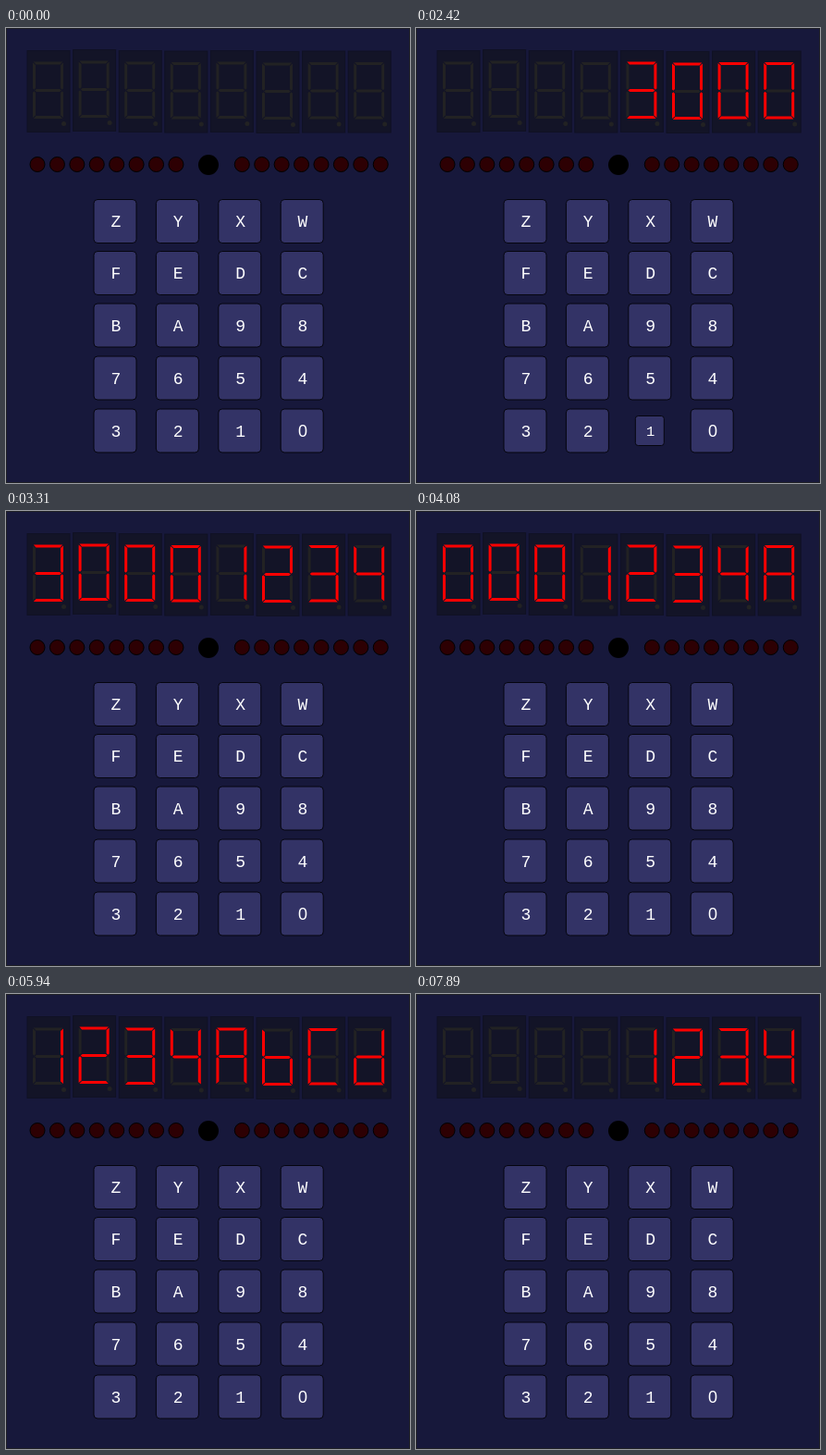
An HTML page for the animation above (8 s loop, 437x492 px).

```html
<!DOCTYPE html>
<html>
<head>
<meta charset="utf-8">
<style>
  html, body { margin: 0; width: 100%; height: 100%; overflow: hidden; background: #17183b; }
  svg { display: block; width: 437px; height: 492px; }
  .tile { fill: #131427; stroke: #101124; }
  .off { fill: #222223; }
  .on { fill: #f00; }
  .led { fill: #2d0003; stroke: #000; }
  .key rect { fill: #333366; stroke: #05050f; }
  .key text { fill: #fff; font-family: "Liberation Mono", monospace; text-anchor: middle; }
  .key .zero { font-family: "Liberation Sans", sans-serif; }
</style>
</head>
<body>
<svg id="stage" viewBox="0 0 437 492"></svg>
<script>
const LOOP = 8000;
const DIGITS = 8;
const BACKSPACE = 'W';

// Segment outlines inside a 33 x 62 digit
const SEGMENTS = {
  a: '0.8,0 32.2,0 29.5,3 3.5,3',
  b: '33,1 33,29 31.5,30.3 30,28.5 30,3.5',
  c: '33,33 33,60.5 30,58 30,33.5 31.5,31.7',
  d: '3.5,58.5 29.5,58.5 32.2,61.5 0.8,61.5',
  e: '0,33 1.5,31.7 3,33.5 3,58 0,60.5',
  f: '0,1 3,3.5 3,28.5 1.5,30.3 0,29',
  g: '2,31 4,29.5 29,29.5 31,31 29,32.5 4,32.5'
};
const GLYPHS = {
  0: 'abcdef', 1: 'bc', 2: 'abdeg', 3: 'abcdg', 4: 'bcfg',
  A: 'abcefg', B: 'cdefg', C: 'adef', D: 'bcdeg'
};
const DIGIT_SHIFT = [0, -1, 0, 0.5, 0, 1, 0.5, 0.5];

// [key, pressed at, display updated at, released at]
const PRESSES = [
  ['3', 50, 130, 200],
  ['0', 560, 620, 690],
  ['0', 1450, 1500, 1560],
  ['0', 1670, 1720, 1780],
  ['1', 2420, 2470, 2570],
  ['2', 2680, 2730, 2830],
  ['3', 2930, 2980, 3110],
  ['4', 3110, 3210, 3310],
  ['A', 3900, 3980, 4080],
  ['B', 4280, 4320, 4360],
  ['C', 5330, 5420, 5510],
  ['D', 5840, 5890, 5940],
  [BACKSPACE, 6820, 6900, 6970],
  [BACKSPACE, 7230, 7280, 7330],
  [BACKSPACE, 7460, 7510, 7560],
  [BACKSPACE, 7740, 7810, 7890]
];

const stage = document.getElementById('stage');

function add(parent, tag, attributes) {
  const node = document.createElementNS('http://www.w3.org/2000/svg', tag);
  for (const name in attributes) node.setAttribute(name, attributes[name]);
  return parent.appendChild(node);
}

function set(node, name, value) {
  if (node.getAttribute(name) !== String(value)) node.setAttribute(name, value);
}

add(stage, 'rect', { x: 0.5, y: 0.5, width: 436, height: 491, fill: 'none', stroke: '#1e1f26' });

const digits = DIGIT_SHIFT.map((shift, i) => {
  const group = add(stage, 'g', { transform: `translate(${29 + 49.6 * i} ${36.5 + shift})` });
  add(group, 'rect', { class: 'tile', x: -6, y: -12, width: 46, height: 88 });
  add(group, 'circle', { class: 'off', cx: 33.5, cy: 67, r: 2.5 });
  const segments = {};
  for (const name in SEGMENTS) {
    segments[name] = add(group, 'polygon', { class: 'off', points: SEGMENTS[name] });
  }
  return segments;
});

for (const start of [34, 255.3]) {
  for (let i = 0; i < 8; i++) {
    add(stage, 'circle', { class: 'led', cx: start + 21.42 * i, cy: 147.5, r: 8 });
  }
}
add(stage, 'circle', { cx: 219, cy: 148, r: 11 });

const keys = {};
['ZYXW', 'FEDC', 'BA98', '7654', '3210'].forEach((labels, row) => {
  [...labels].forEach((label, column) => {
    const x = 118 + 67.4 * column;
    const y = [209, 265, 321.5, 378.5, 435.5][row];
    const group = add(stage, 'g', { class: 'key', transform: `translate(${x} ${y})` });
    const box = add(group, 'rect', { rx: 4 });
    const text = add(group, 'text', { x: 0.8, class: label === '0' ? 'zero' : '' });
    text.textContent = label;
    keys[label] = { box, text };
  });
});

function drawKey({ box, text }, pressed) {
  const width = pressed ? 31 : 46;
  const height = pressed ? 32 : 47;
  set(box, 'x', -width / 2);
  set(box, 'y', -height / 2);
  set(box, 'width', width);
  set(box, 'height', height);
  set(box, 'rx', pressed ? 3 : 4);
  set(text, 'y', pressed ? 5.5 : 6);
  set(text, 'font-size', pressed ? 15.5 : 18);
}

function draw(time) {
  let value = '';
  let held = '';
  for (const [key, down, update, up] of PRESSES) {
    if (time >= update) value = key === BACKSPACE ? value.slice(0, -1) : (value + key).slice(-DIGITS);
    if (time >= down && time < up) held = key;
  }
  const shown = value.padStart(DIGITS);
  digits.forEach((segments, i) => {
    const lit = GLYPHS[shown[i]] || '';
    for (const name in segments) set(segments[name], 'class', lit.includes(name) ? 'on' : 'off');
  });
  for (const label in keys) drawKey(keys[label], label === held);
}

function tick() {
  draw(performance.now() % LOOP);
  requestAnimationFrame(tick);
}
tick();
</script>
</body>
</html>
```
